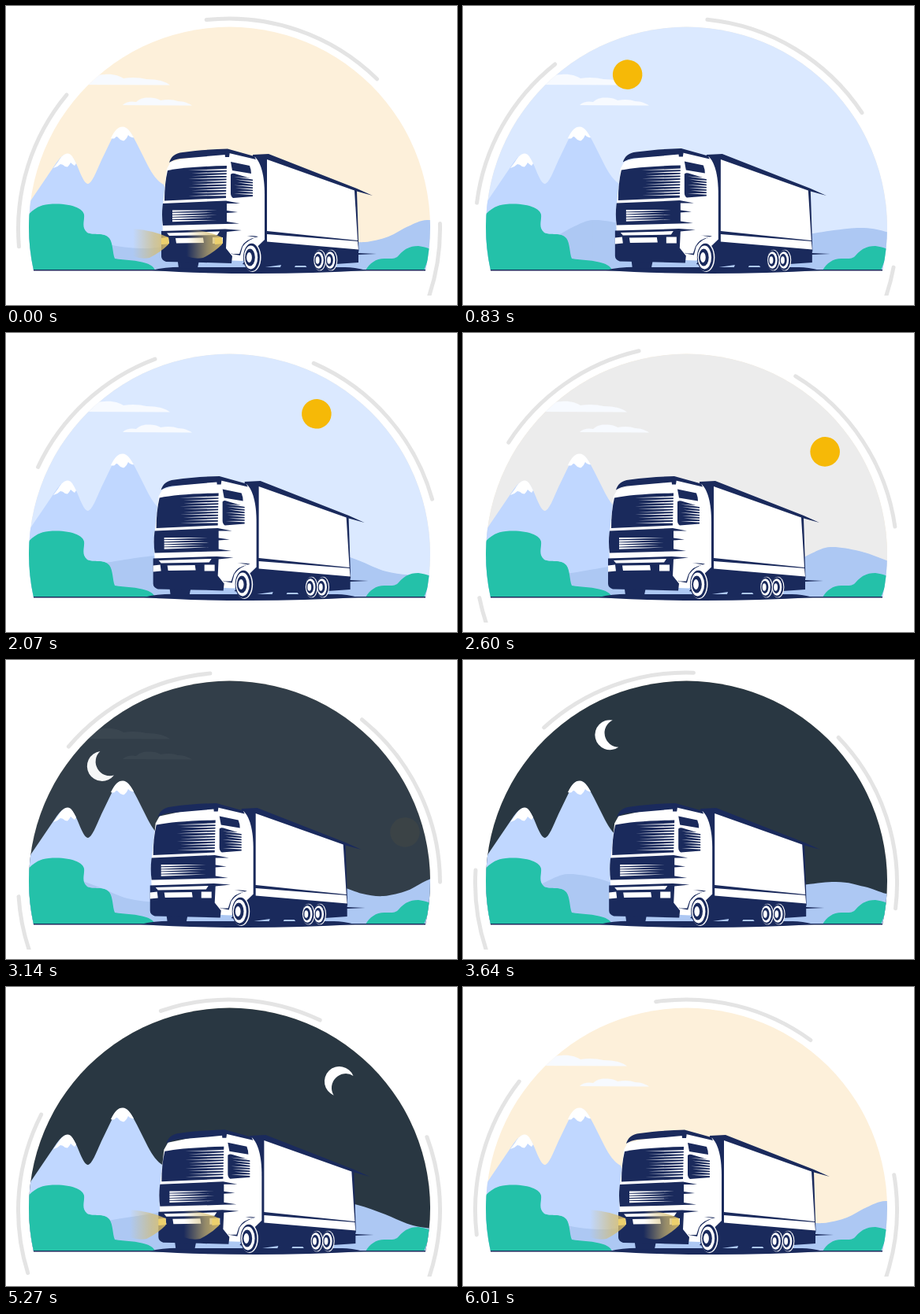
Recreate the animation shown at these times as an HTML page. Size 572x380 px, loop 6050 ms.

```html
<!DOCTYPE html>
<html lang="en">
<head>
<meta charset="utf-8">
<title>Truck through the day</title>
<style>
  html, body { margin: 0; width: 100%; height: 100%; overflow: hidden; background: #fff; }
  svg { display: block; width: 572px; height: 380px; }
  .navy { fill: #1a2a5c; }
  .white { fill: #fff; }
  .bush { fill: #24c1a9; }
  .ring { fill: none; stroke: #e4e4e4; stroke-width: 5; stroke-linecap: round; }
</style>
</head>
<body>
<svg viewBox="0 0 572 380">
  <defs>
    <clipPath id="stage"><rect width="572" height="368"/></clipPath>
    <clipPath id="dome"><path d="M35 336A254.5 254.5 0 1 1 532 336Z"/></clipPath>
    <linearGradient id="glow" gradientUnits="userSpaceOnUse" x1="206" y1="0" x2="161" y2="0">
      <stop offset="0" stop-color="#dfc164" stop-opacity=".9"/>
      <stop offset=".4" stop-color="#d3bb70" stop-opacity=".65"/>
      <stop offset="1" stop-color="#d3bb70" stop-opacity="0"/>
    </linearGradient>
    <g id="lamp">
      <path fill="url(#glow)" d="M206 294Q186 285 161 283V318Q172 322 182 320Q196 313 206 303Z"/>
      <path fill="#ecd06d" d="M197 295L206 294L207 302L197 303Z"/>
    </g>
  </defs>

  <g clip-path="url(#stage)"><g id="rings"></g></g>

  <g clip-path="url(#dome)">
    <rect width="572" height="340" fill="#fdf0da"/>
    <rect id="day" width="572" height="340" fill="#dbe9ff"/>
    <rect id="dusk" width="572" height="340" fill="#ececec"/>
    <rect id="night" width="572" height="340" fill="#293742"/>
    <g id="clouds" fill="#f7faff">
      <path d="M95 100C106 91 114 87 125 87C136 86 144 89 149 92C160 90 170 91 178 93C192 93 203 96 208 100.500Z"/>
      <path d="M148 126C153 121 160 121 165 122C170 117 176 116 183 116.500C190 117 193 118 196 120C205 118 213 119 218 121C226 121 232 124 236 126.500Z"/>
    </g>
    <circle id="sun" cy="-247" r="18.800" fill="#f6b907"/>
    <path id="moon" class="white" d="M10.400 -263A19 19 0 1 0 4.100 -228.500A18 18 0 0 1 10.400 -263Z"/>
    <path fill="#c0d7ff" d="M20 264L62 202C68 193 73 188 78 188C84 188 89 199 94 212C98 221 101 226 104 226C109 225 114 212 121 196L135 167C139 158 143 154 148 154C155 154 160 163 166 175L180 203C186 214 191 222 200 227L240 336H20Z"/>
    <path class="white" d="M60 206L66 198C70 191 74 187.500 78 187.500C83 187.500 86 194 89 200L87 203Q84 201 82 199Q80 203 78 204.500L75 204Q72 201 69 201Q65 205 60 206ZM133 168C138 158 142 153.500 148 153.500C154 153.500 158 160 162 167Q158 168 155 164Q153 169 150 171Q146 172 143 168Q140 164 138 168Q135 169 133 168Z"/>
    <g id="hills" fill="#adc8f3"></g>
    <path class="bush" d="M20 336V276C30 261 40 253 54 252C76 250 97 255 99 265C100 273 95 281 103 288C111 292 124 287 131 295C136 302 135 314 138 321C150 323 167 323 178 327C184 329 188 332 189 336Z"/>
    <path class="bush" d="M456 336C461 327 469 321 480 321C488 321 494 322 498 317C506 308 513 305 523 305C530 306 534 307 540 310L530 336Z"/>
  </g>

  <path d="M35 335.700H532" stroke="#1a2a5c" stroke-width="1.500"/>

  <g id="truck">
    <path class="navy" d="M185 336Q205 331 230 332H430Q442 332 457 336Q390 340 320 340Q245 340 185 336Z"/>
    <path class="navy" d="M217 318H246L243 333Q231 335 219 333Z"/>
    <path class="navy" d="M322 300L447 311V314L470 315L447 316V326L418 328L417 334H383L380 330H367L366 332H348L349 329L322 333L300 328Z"/>

    <path class="navy" d="M313 189L333 188L445 232L465 241L445 235.500L447.500 312L320 302Z"/>
    <path class="white" d="M331 195L442 234.500L446 298L331 286Z"/>
    <path class="white" d="M331 290L446 299L447 309.500L331 299.500Z"/>

    <g id="cab">
      <path class="white" d="M209 198L280 183L316 192C323 199 328 214 328 240V297L300 324L200 320L198 262L204 207Z"/>
      <path class="navy" d="M207 199C209 192 214 187 224 186C244 183 263 182 281 181.500L315 191L317 195L283 187L278 189L221 194Q213 195 207 199Z"/>
      <path class="navy" d="M277 183L284 185L283 192L278 192Z"/>
      <path class="navy" d="M205 209Q230 204 280 203L279 244L201 247.500Q201 226 205 209Z"/>
      <path class="navy" d="M285 198L309 203Q311 208 311 213L287 209Z"/>
      <path class="navy" d="M285 214Q287 212 290 213L313 220V242L288 244Q285 242 285 238Z"/>
      <path class="navy" d="M199 251L279 247.500L297 251L280 251V260L294 262L280 263V274L296 276.500L278 277L199 279Q197 265 199 251Z"/>
      <path class="navy" d="M197 286L278 283.500L299 285L280 287L279 308L287 318L286 327L250 326L203 325Q197 323 197 318Z"/>
      <path class="white" d="M204 288.500L271 286.500L268 291L207 292Z"/>
      <path class="white" d="M215 295L250 294.500L251 301L216 301.500Z"/>
      <path class="white" d="M197 295L206 294L207 302L197 303ZM262 294L275 294V302H262Z"/>
      <path class="navy" d="M290 297Q303 290 320 293Q306 297 300 306L297 317L286 315Z"/>
      <path class="white" d="M281 288L318 294Q304 296 299 306L296 315L287 315L280 307Z"/>
      <g id="streaks" class="white"></g>
    </g>
    <g id="wheels"></g>

    <g id="lights">
      <use href="#lamp"/>
      <use href="#lamp" x="68"/>
    </g>
  </g>
</svg>

<script>
const LOOP = 6050;
const el = id => document.getElementById(id);
const rad = deg => deg * Math.PI / 180;

function add(parent, tag, attrs) {
  const node = document.createElementNS('http://www.w3.org/2000/svg', tag);
  for (const key in attrs) node.setAttribute(key, attrs[key]);
  return el(parent).appendChild(node);
}

// Angles are in degrees, clockwise from the top.
function ringArc(from, to) {
  const r = 267.5;
  const at = a => `${r * Math.sin(rad(a))} ${-r * Math.cos(rad(a))}`;
  add('rings', 'path', { class: 'ring', d: `M${at(from)}A${r} ${r} 0 0 1 ${at(to)}` });
}
[[-94.8, -50.4], [-6.2, 44.5], [88.5, 132.9], [176.7, 221.1]].forEach(a => ringArc(...a));

// One hill tile, smoothed through its crests and valleys.
const TILE = 510;
const ridge = [[24, 272], [60, 277], [95, 289], [130, 303], [170, 308], [205, 305], [277, 293],
  [359, 282], [400, 288], [428, 297], [455, 300], [485, 293], [510, 280]];
const ridgeAt = i => {
  const n = ridge.length, [x, y] = ridge[(i + n) % n];
  return [x + TILE * Math.floor(i / n), y];
};
function ridgePath() {
  const [x, y] = ridgeAt(0);
  let d = `M${x - 1} ${y}H${x}`; // overlaps the previous tile
  for (let i = 0; i < ridge.length; i++) {
    const [a, b, c, e] = [-1, 0, 1, 2].map(k => ridgeAt(i + k));
    d += `C${b[0] + (c[0] - a[0]) / 6} ${b[1] + (c[1] - a[1]) / 6} `
       + `${c[0] - (e[0] - b[0]) / 6} ${c[1] - (e[1] - b[1]) / 6} ${c}`;
  }
  return d + `V338H${x - 1}Z`;
}
for (let k = -2; k < 2; k++) {
  add('hills', 'path', { d: ridgePath(), transform: `translate(${k * TILE})` });
}

// A thin wedge that narrows to a point at (tip, y).
function streak(tip, base, y, slope, thickness) {
  const end = y + slope;
  add('streaks', 'path', { d: `M${tip} ${y}L${base} ${end - thickness / 2}V${end + thickness / 2}Z` });
}
for (let i = 0; i < 10; i++) {
  streak(231 + 5 * Math.abs(Math.sin(i * 2.1)), 280.5, 209 + i * 3.6, -1.2, 1.9);
}
for (let i = 0; i < 7; i++) streak(289 + (i % 3) * 2, 314, 217 + i * 3.6, 2.8 - i * 0.35, 1.8);
for (let i = 0; i < 5; i++) streak(268 - (i % 2) * 6, 211, 259.5 + i * 3.1, 1.2, 2.3);

// The rim, tyre and hub shift left as they get smaller.
function wheel(cx, cy, size) {
  [[11, 18.5, 'white'], [10.5, 17.7, 'navy'], [8.7, 15, 'white'], [6.3, 11, 'navy'], [3.4, 6.5, 'white']]
    .forEach(([rx, ry, tone], i) => add('wheels', 'ellipse', {
      cx: cx - i * size, cy, rx: rx * size, ry: ry * size, class: tone
    }));
}
wheel(312.5, 319.5, 1);
wheel(412.5, 323, 0.72);
wheel(398, 323, 0.72);

// Opacity of something shown from `start` to `end`, with short fades.
function shown(t, start, end, fade = 0.2) {
  const edge = v => Math.max(0, Math.min(1, v / fade));
  return edge(t - start) * edge(end - t);
}
const opacity = (id, value) => el(id).setAttribute('opacity', value);
const transform = (id, value) => el(id).setAttribute('transform', value);

function draw(t) {
  transform('rings', `translate(283 283.5) rotate(${14.4 * t})`);
  transform('sun', `translate(282 323) rotate(${35.65 * t - 46.9})`);
  transform('moon', `translate(282 323) rotate(${35.3 * t - 151.3})`);
  transform('hills', `translate(${TILE / 3 * t % TILE})`);

  const drift = -5 * Math.min(t, Math.max(0, 6 - t));
  transform('truck', `translate(${drift})`);
  transform('cab', `translate(0 ${0.5 * Math.sin(2 * Math.PI * t / 0.5)})`);

  const night = shown(t, 2.95, 5.55);
  opacity('day', shown(t, 0.4, 2.35));
  opacity('dusk', shown(t, 2.1, 3.2));
  opacity('night', night);
  opacity('clouds', 1 - night);
  opacity('sun', shown(t, 0.4, 3.15));
  opacity('moon', night);
  opacity('lights', 1 - shown(t, 0.4, 4.25));
}

const start = performance.now();
function tick() {
  draw((performance.now() - start) % LOOP / 1000);
  requestAnimationFrame(tick);
}
tick();
</script>
</body>
</html>
```
